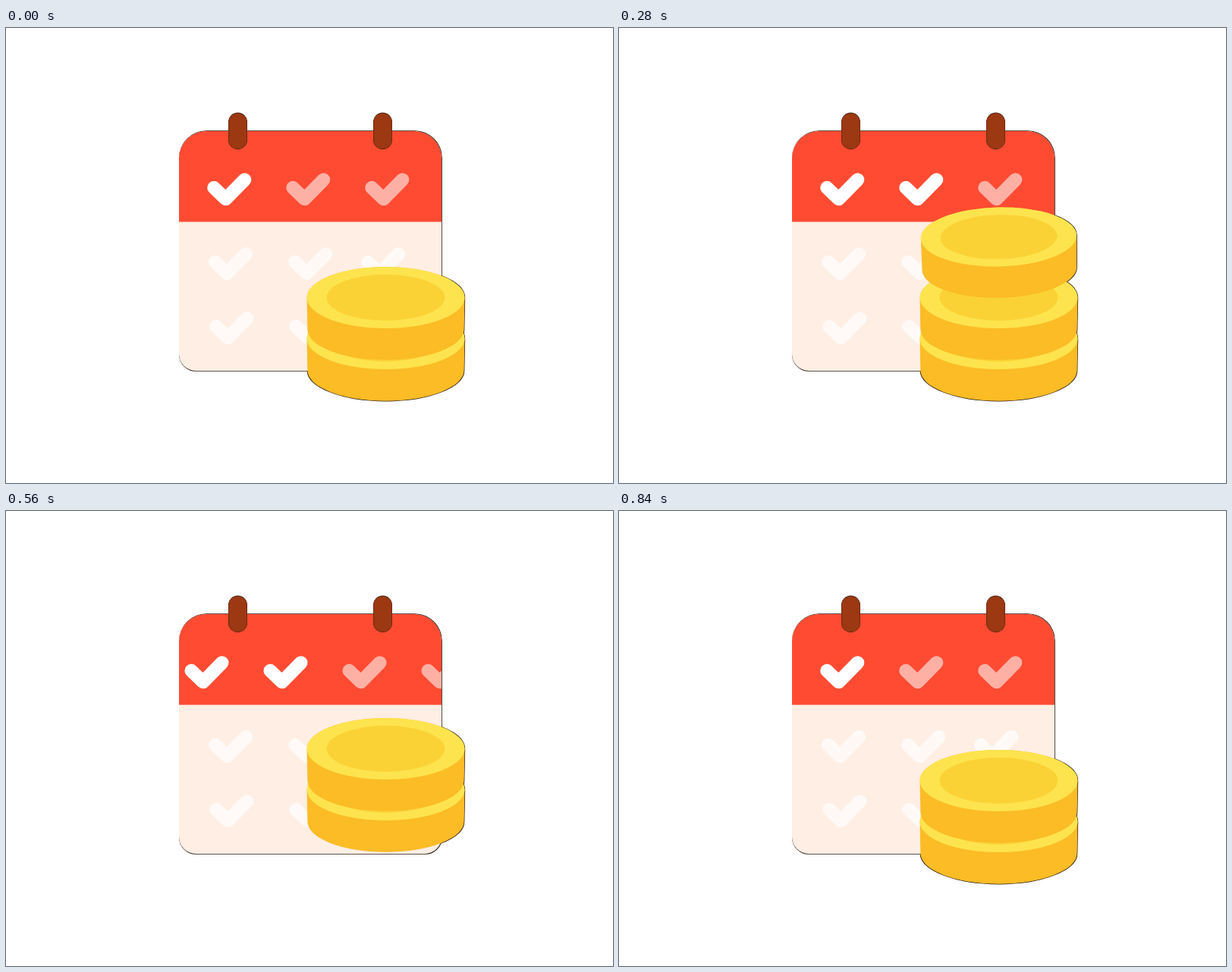
These frames come from a looping animation (800 by 600 pixels, 1000 ms). An HTML page with a canvas:

```html
<!DOCTYPE html>
<html lang="en">
<head>
<meta charset="utf-8">
<title>Calendar and coins</title>
<style>
  html, body { margin: 0; width: 100%; height: 100%; overflow: hidden; background: #fff; }
  canvas { display: block; }
</style>
</head>
<body>
<canvas id="stage" width="800" height="600"></canvas>
<script>
const ctx = document.getElementById('stage').getContext('2d');
const LOOP = 1000, STEP = 20, COLUMN = 104, COIN_GAP = 54;
const RADIUS = 104, DEPTH = 45.6, FLAT = 0.39, COIN_X = 500.5, COIN_Y = 376.5;
const EDGE = '#2a1a10';

// time, x, y, scale, axis angle in degrees, face squash, opacity
const FLIGHT = [
  [20, 522, 205, 0.5, -70, 0.3, 0],
  [60, 521, 208, 0.6, -46, 0.23, 1],
  [140, 518, 225.5, 0.775, 8.5, 0.08, 1],
  [220, 501.5, 257, 0.923, 87, 0.365, 1],
  [320, COIN_X, COIN_Y - COIN_GAP, 1.03, 90, FLAT, 1],
  [380, COIN_X, COIN_Y - COIN_GAP, 1, 90, FLAT, 1]
];

const progress = (t, from, to) => Math.min(1, Math.max(0, (t - from) / (to - from)));
const easeInOut = p => p < 0.5 ? 2 * p * p : 1 - 2 * (1 - p) ** 2;

function bezier(p, x1, y1, x2, y2) {
  const at = (s, a, b) => 3 * (1 - s) ** 2 * s * a + 3 * (1 - s) * s * s * b + s ** 3;
  let low = 0, high = 1;
  for (let i = 0; i < 24; i++) {
    const mid = (low + high) / 2;
    if (at(mid, x1, x2) < p) low = mid; else high = mid;
  }
  return at(low, y1, y2);
}

function flightAt(t) {
  const i = Math.max(1, FLIGHT.findIndex(key => key[0] >= t));
  const a = FLIGHT[i - 1], b = FLIGHT[i], p = progress(t, a[0], b[0]);
  const [x, y, scale, angle, squash, alpha] = a.map((v, k) => v + (b[k] - v) * p).slice(1);
  return { x, y, scale, angle, squash, alpha };
}

const stacked = (y, alpha = 1) =>
  ({ x: COIN_X, y, scale: 1, angle: 90, squash: FLAT, alpha });

// Coins from back to front
function coinsAt(t) {
  const top = COIN_Y - COIN_GAP, low = COIN_Y + COIN_GAP;
  if (t >= 520) {
    const drop = COIN_GAP * easeInOut(progress(t, 520, 640));
    return [stacked(COIN_Y + drop), stacked(top + drop)];
  }
  const list = [stacked(low, 1 - progress(t, 440, 520)), stacked(COIN_Y)];
  if (t >= 380) list.push(stacked(top));
  else if (t > 20) list.push(flightAt(t));
  return list;
}

function disc(y, r, squash, color) {
  ctx.fillStyle = color;
  ctx.beginPath();
  ctx.ellipse(0, y, r, r * squash, 0, 0, 2 * Math.PI);
  ctx.fill();
}

function drawCoin({ x, y, scale, angle, squash, alpha }, outline) {
  const half = DEPTH * Math.sqrt(1 - squash * squash) / 2, back = RADIUS * 0.992;
  ctx.save();
  ctx.globalAlpha = alpha;
  ctx.translate(x, y);
  ctx.rotate((angle - 90) * Math.PI / 180);
  ctx.scale(scale, scale);
  ctx.beginPath();
  ctx.ellipse(0, -half, RADIUS, RADIUS * squash, 0, Math.PI, 2 * Math.PI);
  ctx.ellipse(0, half, back, back * squash, 0, 0, Math.PI);
  ctx.closePath();
  if (outline) {
    ctx.strokeStyle = EDGE;
    ctx.lineWidth = 1.4;
    ctx.stroke();
  } else {
    ctx.fillStyle = '#fbbc26';
    ctx.fill();
    disc(-half, RADIUS, squash, '#fde44e');
    disc(-half, 78, squash, '#fbd236');
  }
  ctx.restore();
}

function box(x, y, w, h, radii, color) {
  ctx.fillStyle = color;
  ctx.beginPath();
  ctx.roundRect(x, y, w, h, radii);
  ctx.fill();
}

// The origin is the inner corner of the tick
function tick(x, y, color, scale = 1) {
  ctx.save();
  ctx.translate(x, y);
  ctx.scale(scale, scale);
  ctx.strokeStyle = color;
  ctx.lineWidth = 17.6;
  ctx.lineCap = ctx.lineJoin = 'round';
  ctx.beginPath();
  ctx.moveTo(-15.5, -20.5);
  ctx.lineTo(0, -5.5);
  ctx.lineTo(25, -31);
  ctx.stroke();
  ctx.restore();
}

function drawHeaderTicks(t) {
  const slide = COLUMN * bezier(progress(t, 500, 840), 0.3, 0.1, 0.05, 1);
  const pop = 1 + 0.47 * Math.sin(Math.PI * progress(t, 20, 220));
  const glow = 0.56 + 0.44 * progress(t, 20, 100);
  for (let i = 0; i < 4; i++) {
    const alpha = i === 0 ? 1 : i === 1 ? glow : 0.56;
    tick(289.5 + i * COLUMN - slide, 231, `rgba(255,255,255,${alpha})`, i === 1 ? pop : 1);
  }
}

function drawCalendar(t) {
  box(228, 135.2, 346.8, 317.6, [36, 36, 22, 22], EDGE);
  ctx.save();
  ctx.beginPath();
  ctx.roundRect(228, 136, 346, 316, [36, 36, 22, 22]);
  ctx.clip();
  ctx.fillStyle = '#feeee4';
  ctx.fillRect(228, 136, 346, 316);
  ctx.fillStyle = '#ff4b32';
  ctx.fillRect(228, 136, 346, 119.6);
  drawHeaderTicks(t);
  for (const x of [0, 105, 201]) {
    tick(291.3 + x, 329, '#fffaf7');
    tick(292.5 + x, 414, '#fffaf7');
  }
  ctx.restore();
  for (const x of [293, 484]) {
    box(x, 111.6, 25, 48.4, 12.5, EDGE);
    box(x + 0.4, 112.2, 24.2, 47.4, 12.1, '#9c3812');
  }
}

function draw(t) {
  const coins = coinsAt(t);
  ctx.fillStyle = '#fff';
  ctx.fillRect(0, 0, 800, 600);
  coins.forEach(coin => drawCoin(coin, true));
  drawCalendar(t);
  coins.forEach(coin => drawCoin(coin, false));
}

function frame(now) {
  draw(Math.floor(now % LOOP / STEP) * STEP);
  requestAnimationFrame(frame);
}
draw(0);
requestAnimationFrame(frame);
</script>
</body>
</html>
```
